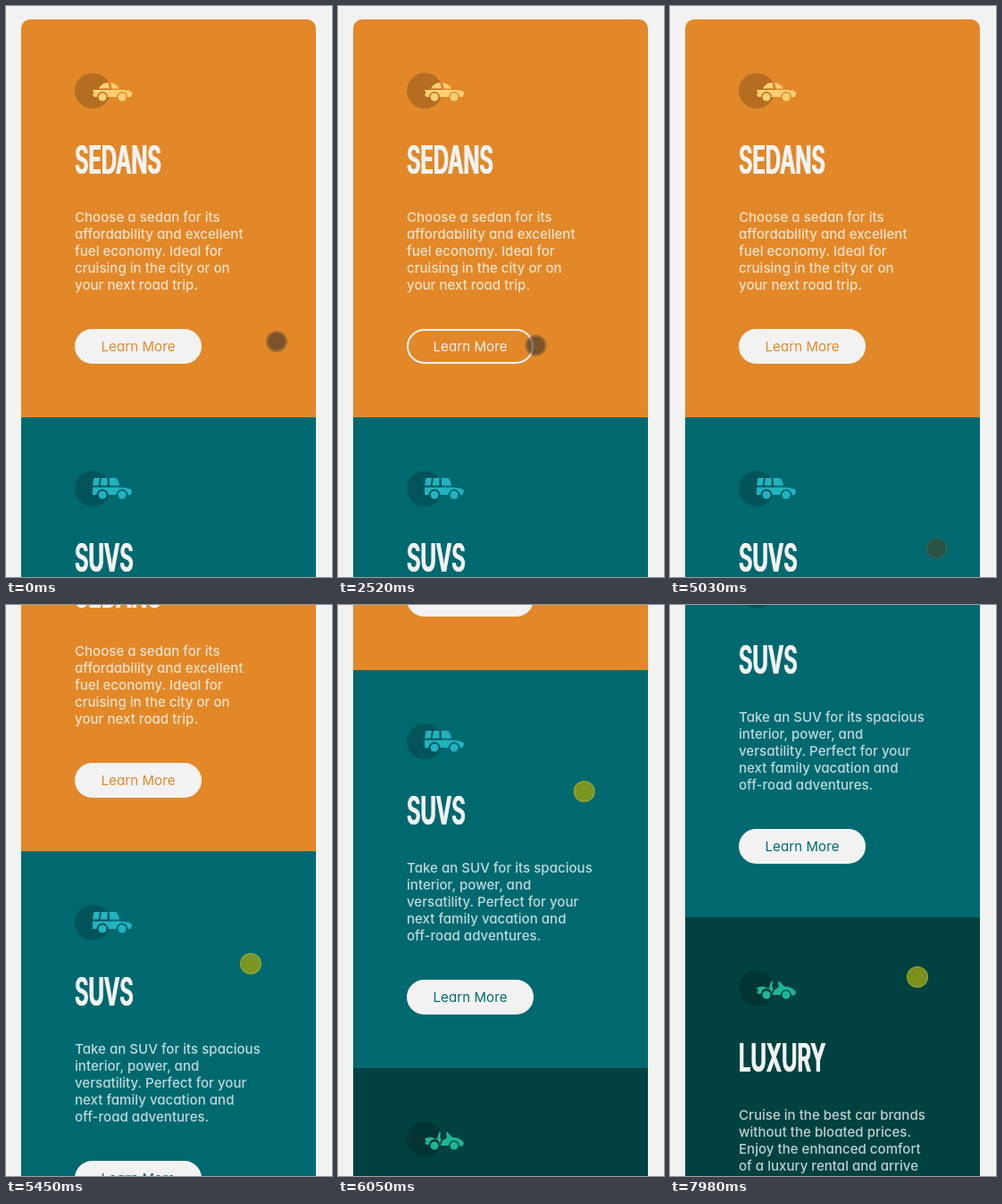
An HTML page for the animation above (8000 ms loop, 365 by 640 pixels).

```html
<!DOCTYPE html>
<html lang="en">
<head>
<meta charset="utf-8">
<title>Car classes</title>
<style>
  html, body { margin: 0; width: 100%; height: 100%; overflow: hidden; background: #f2f2f2; }
  #stage { position: relative; width: 365px; height: 640px; overflow: hidden; background: #f2f2f2;
    font: 400 15px/19px Inter, "Open Sans", sans-serif; font-feature-settings: "cv11"; }
  #page { position: absolute; left: 17px; top: 15px; width: 330px; border-radius: 10px; overflow: hidden; }
  section { position: relative; height: 446px; background: var(--bg); }
  section > * { position: absolute; left: 60px; margin: 0; white-space: nowrap; }
  svg { top: 60px; fill: var(--icon); }
  h2 { top: 135px; font-size: 44px; line-height: 44px; font-weight: 600; color: #f2f2f2;
    transform: scaleX(.54); transform-origin: 0 0; text-shadow: 1.1px 0, -1.1px 0; }
  p { top: 212px; font-weight: 500; color: rgba(255, 255, 255, .75); letter-spacing: .04px; }
  .button { top: 347px; width: 142px; height: 39px; box-sizing: border-box; border: 2px solid #f2f2f2;
    border-radius: 20px; background: #f2f2f2; color: var(--bg); line-height: 35px;
    text-align: center; letter-spacing: .1px; }
  #touch { position: absolute; left: -12px; top: -12px; width: 24px; height: 24px; box-sizing: border-box;
    border: 2px solid; border-radius: 50%; background-clip: padding-box; }
</style>
</head>
<body>
<div id="stage"><div id="page"></div><div id="touch"></div></div>
<script>
const LOOP = 8000;
const page = document.getElementById('page');
const touch = document.getElementById('touch');

const cars = [
  { name: 'SEDANS', bg: '#e28829', icon: '#ffd073',
    lines: ['Choose a sedan for its', 'affordability and excellent', 'fuel economy. Ideal for',
      'cruising in the city or on', 'your next road trip.'],
    path: `M27 17.5q3-6 9-6.5h1.5l1.5 6.5zM40 11q6 0 10 6.5h-8z
      M20 19H54q9 .5 10 3v2l-1.5 3H59A6 6 0 0 0 47 27H37A6 6 0 0 0 25 27H22l-2-2.5 1.5-2z` },
  { name: 'SUVS', bg: '#006970', icon: '#22b3c0',
    lines: ['Take an SUV for its spacious', 'interior, power, and', 'versatility. Perfect for your',
      'next family vacation and', 'off-road adventures.'],
    path: `M21.5 8h6.5l-1.5 8.500h-6.5zM30 8h6.5v8.5h-8zM39 8h6q3.5 0 5 8.5h-11z
      M20 18.5H50q13 .5 14 3.5l-.3 2.5-1.5 2.5H59.5A6.5 6.500 0 0 0 46.5 27H37.5A6.5 6.5 0 0 0 24.5 27H20z` },
  { name: 'LUXURY', bg: '#004241', icon: '#1db597',
    lines: ['Cruise in the best car brands', 'without the bloated prices.', 'Enjoy the enhanced comfort',
      'of a luxury rental and arrive', 'in style.'],
    path: `M20 19.5q6-3.5 11-.5l3 .5 1-4.5 1.5-3.5 1.500 .5-.5 5 1 4-2 5H37A6 6 0 0 0 25 25.500l-3.500 .5-1-2.5 1.500-1.500z
      M40 21.5l5-3.5-1-5 1-1.5 6 6q10 .5 13 6.5l-1.500 3.5H59A6 6 0 0 0 47 27H37.5z` }
];

page.innerHTML = cars.map(c => `
  <section style="--bg:${c.bg};--icon:${c.icon}">
    <svg width="64" height="40"><circle cx="20" cy="20" r="20" fill="#000" opacity=".2"/>
      <path d="${c.path}"/><circle cx="31" cy="27" r="4.5"/><circle cx="53" cy="27" r="4.5"/></svg>
    <h2>${c.name}</h2>
    <p>${c.lines.join('<br>')}</p>
    <div class="button">Learn More</div>
  </section>`).join('');
const button = page.querySelector('.button');

// start, duration, end x, end y, sideways bow
const moves = [
  [710, 870, 207, 380.5, 0],
  [2390, 980, 302, 381, 0],
  [3960, 920, 298.5, 608, 5],
  [5137, 1050, 276, 205, -13],
  [6410, 900, 287, 597, 0],
  [7565, 1050, 278, 331, -4.5]
];
const presses = [[1640, 1800], [3510, 3590], [5020, 6250], [7460, 9000]];

const clamp = v => Math.min(1, Math.max(0, v));
const ramp = (t, start, length) => clamp((t - start) / length);
const mix = (a, b, k) => a + (b - a) * k;

// cubic-bezier(.25, .1, .25, 1)
function ease(x) {
  if (x <= 0 || x >= 1) return clamp(x);
  const curve = (a, b, u) => 3 * a * u * (1 - u) ** 2 + 3 * b * u * u * (1 - u) + u ** 3;
  let lo = 0, hi = 1;
  for (let i = 0; i < 24; i++) {
    const mid = (lo + hi) / 2;
    if (curve(.25, .25, mid) < x) lo = mid; else hi = mid;
  }
  return curve(.1, 1, lo);
}

function touchAt(t) {
  let x = 303, y = 376;
  for (const [start, length, endX, endY, bow] of moves) {
    if (t < start) break;
    const k = ease((t - start) / length);
    x = mix(x, endX, k) + bow * 4 * k * (1 - k);
    y = mix(y, endY, k);
  }
  return [x, y];
}

// The page trails the finger, then settles.
function scrollAt(t, y) {
  if (t < 5137) return 0;
  if (t < 6410) return Math.max(0, 608 - y - mix(21, 5, ramp(t, 5700, 570)));
  return 398 + (t < 7565 ? 0 : Math.max(0, 597 - y - 21));
}

const blend = (a, b, k) => `rgba(${a.map((v, i) => mix(v, b[i], k)).join()})`;

function draw(t) {
  const [x, y] = touchAt(t);
  page.style.transform = `translateY(${-Math.round(scrollAt(t, y))}px)`;
  touch.style.transform = `translate(${x}px, ${y}px)`;

  const down = Math.max(...presses.map(([a, b]) => ramp(t, a, 60) * (1 - ramp(t, b, 70))));
  touch.style.backgroundColor = blend([52, 48, 44, .58], [146, 158, 20, .86], down);
  touch.style.borderColor = blend([70, 66, 62, .4], [160, 172, 36, .9], down);

  const hover = ramp(t, 1800, 200) * (1 - ramp(t, 3510, 150));
  const white = [242, 242, 242, 1], orange = [226, 136, 41, 1];
  button.style.backgroundColor = blend(white, orange, hover);
  button.style.color = blend(orange, white, hover);
}

const begin = performance.now();
function tick() {
  draw((performance.now() - begin) % LOOP);
  requestAnimationFrame(tick);
}
tick();
</script>
</body>
</html>
```
